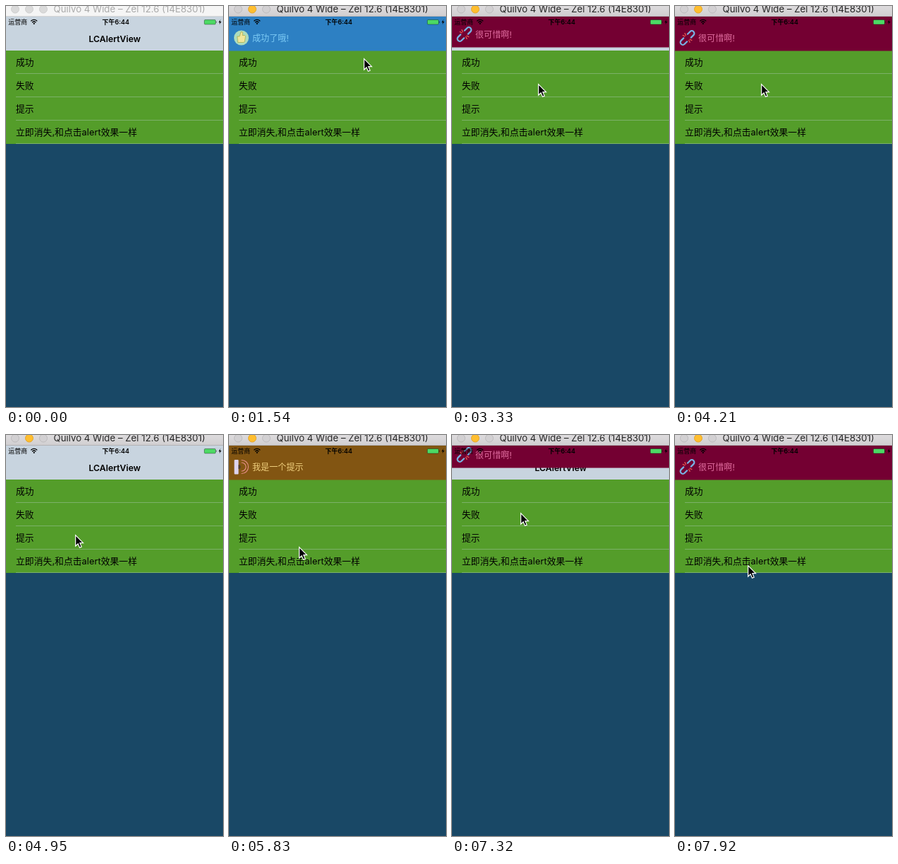
Animation of 308 by 567 pixels, one loop 8 s. Source, as an HTML page:

```html
<!DOCTYPE html>
<html lang="zh-CN">
<head>
<meta charset="utf-8">
<title>LCAlertView</title>
<style>
html, body { margin: 0; width: 100%; height: 100%; overflow: hidden; background: #194866; }
svg { display: block; width: 308px; height: 567px; font-family: Inter, "Noto Sans CJK SC", "Noto Sans CJK", sans-serif; }
.row { font-size: 12.85px; }
.msg { font-size: 12.1px; }
.status { font-size: 9px; font-weight: 500; }
.nav { font-size: 12.3px; font-weight: 600; text-anchor: middle; }
.title { font-size: 13.25px; }
.line { fill: none; stroke-linecap: round; stroke-linejoin: round; }

/* The screen refreshes every 148 ms, which is 1.85% of the loop. */
.alert, .cursor, .active { animation: 8s step-end infinite; }
.alert { transform: translateY(-49px); }
.success { animation-name: success; }
.fail { animation-name: fail; }
.hint { animation-name: hint; }
.active { animation-name: activate; }
.cursor { animation-name: point; }

@keyframes activate {
  0% { opacity: 0; }
  9.95%, 100% { opacity: 1; }
}
@keyframes success {
  0%, 24.75%, 100% { transform: translateY(-49px); }
  13.65% { transform: translateY(-20px); }
  15.5% { transform: translateY(-5px); }
  17.35% { transform: none; }
  22.9% { transform: translateY(-24px); }
}
@keyframes fail {
  0%, 58.05% { transform: translateY(-49px); }
  39.55% { transform: translateY(-20px); }
  41.4% { transform: translateY(-5px); }
  43.25% { transform: none; }
  56.2% { transform: translateY(-24px); }
  89.5% { transform: translateY(-38px); }
  91.35% { transform: translateY(-17px); }
  93.2% { transform: translateY(-4px); }
  95.05%, 100% { transform: none; }
}
@keyframes hint {
  0%, 76.55%, 100% { transform: translateY(-49px); }
  63.6% { transform: translateY(-24px); }
  65.45% { transform: translateY(-5px); }
  67.3% { transform: none; }
  74.7% { transform: translateY(-24px); }
}
@keyframes point {
  0% { transform: translate(400px, 93px); }
  6.25% { transform: translate(200px, 94px); animation-timing-function: steps(2); }
  9.95% { transform: translate(191px, 74px); }
  28.45% { transform: translate(191px, 74px); animation-timing-function: steps(4); }
  35.85% { transform: translate(122px, 110px); }
  58.05% { transform: translate(122px, 110px); animation-timing-function: steps(2); }
  61.75% { transform: translate(98px, 141px); }
  71% { transform: translate(98px, 145px); }
  72.85% { transform: translate(99px, 158px); }
  74.7% { transform: translate(101px, 171px); }
  76.55% { transform: translate(102px, 176px); }
  80.25% { transform: translate(102px, 176px); animation-timing-function: steps(4); }
  87.65% { transform: translate(97px, 110px); }
  95.05% { transform: translate(97px, 110px); animation-timing-function: steps(2); }
  98.75%, 100% { transform: translate(103px, 184px); }
}
</style>
</head>
<body>
<svg viewBox="0 0 308 567">
  <defs>
    <linearGradient id="chrome" x2="0" y2="1">
      <stop stop-color="#dddbdd"/>
      <stop offset="1" stop-color="#d0ced0"/>
    </linearGradient>
  </defs>

  <rect width="308" height="567" fill="#194866"/>
  <rect y="15" width="308" height="48" fill="#c8d4df"/>
  <text class="nav" x="154.3" y="51">LCAlertView</text>

  <rect y="63" width="308" height="132" fill="#549d2a"/>
  <path d="M14 95.5H308M14 128.5H308M14 161.5H308M14 194.5H308" stroke="#7bb168"/>
  <g class="row">
    <text x="14" y="84">成功</text>
    <text x="14" y="117">失败</text>
    <text x="14" y="150">提示</text>
    <text x="14" y="183">立即消失,和点击alert效果一样</text>
  </g>

  <g class="alert success">
    <rect y="15" width="308" height="48.5" fill="#2d80c3"/>
    <circle cx="17.5" cy="45" r="10.5" fill="#addcbd"/>
    <path class="line" d="M12 43h3l2-6.500q3-.5 2.600 2.500l-.6 2.500h3.500q1.500 1 .8 2.500l-1 6q-.3 1.500-2 1.500H13z" style="fill:#f1e69a" stroke="#a9ae4c" stroke-width=".8"/>
    <text class="msg" x="33" y="49.5" fill="#7dcbf5">成功了哦!</text>
  </g>

  <g class="alert fail">
    <rect y="15" width="308" height="48.5" fill="#740032"/>
    <g class="line" transform="translate(17.5 45) rotate(-45)" stroke="#78b4e4" stroke-width="2.2">
      <path d="M-4-3.5h-5a3.5 3.5 0 0 0 0 7h5M4-3.5h5a3.5 3.5 0 0 1 0 7h-5"/>
      <path d="M-1-4l-1-3M1-4l1-3M-1 4l-1 3M1 4l1 3" stroke="#e5544f" stroke-width="1.4"/>
    </g>
    <text class="msg" x="33" y="49.5" fill="#df6c9e">很可惜啊!</text>
  </g>

  <g class="alert hint">
    <rect y="15" width="308" height="48.5" fill="#825512"/>
    <rect x="7.5" y="35" width="6" height="20.5" rx="1" fill="#ddd3ef"/>
    <path d="M13.5 42q3 0 3 3t-3 3z" fill="#4b3a32"/>
    <path class="line" d="M18 39a6 6 0 0 1 0 12M18 35.500a9.500 9.500 0 0 1 0 19" stroke="#e08a80" stroke-width="1.2"/>
    <text class="msg" x="33" y="49.5" fill="#f0d07e">我是一个提示</text>
  </g>

  <g class="status">
    <text x="3.3" y="26">运营商</text>
    <text x="155.8" y="26" text-anchor="middle" font-weight="600">下午6:44</text>
  </g>
  <path class="line" d="M35.8 21a5.8 5.8 0 0 1 8 0M37.6 23a3.2 3.2 0 0 1 4.4 0" stroke="#000" stroke-width="1.3"/>
  <circle cx="39.8" cy="24.9" r="1.1"/>
  <rect x="281.5" y="19.5" width="16" height="6.5" rx="1.2" fill="#4cd964" stroke="#000" stroke-opacity=".5" stroke-width=".7"/>
  <path d="M298.5 21.5q1.5 1.3 0 2.6z"/>
  <path d="M304.5 19l-2.7 4.2h1.8l-.8 3 2.9-4.2h-1.9z"/>

  <rect width="308" height="15" fill="#f5f5f5"/>
  <path d="M0 14.5H308" stroke="#d5d5d5"/>
  <g fill="#dadada" stroke="#cfcfcf">
    <circle cx="13" cy="4.5" r="5.5"/>
    <circle cx="33" cy="4.5" r="5.5"/>
    <circle cx="53" cy="4.5" r="5.5"/>
  </g>
  <text class="title" x="67.5" y="9" fill="#aaa">Quilvo 4 Wide – Zel 12.6 (14E8301)</text>

  <g class="active">
    <rect width="308" height="15" fill="url(#chrome)"/>
    <path d="M0 14.5H308" stroke="#b4b2b4"/>
    <g fill="#d2d0d2" stroke="#bdbbbd">
      <circle cx="13" cy="4.5" r="5.5"/>
      <circle cx="33" cy="4.5" r="5.5" fill="#ffbe2f" stroke="#e3a630"/>
      <circle cx="53" cy="4.5" r="5.5"/>
    </g>
    <text class="title" x="67.5" y="9" fill="#262626">Quilvo 4 Wide – Zel 12.6 (14E8301)</text>
  </g>

  <g class="cursor">
    <path d="M.7.7v15.3l3.5-3.3 2.3 5.5 2.7-1.1-2.3-5.4h4.6z" stroke="#fff" stroke-width="1.2"/>
  </g>
</svg>
</body>
</html>
```
